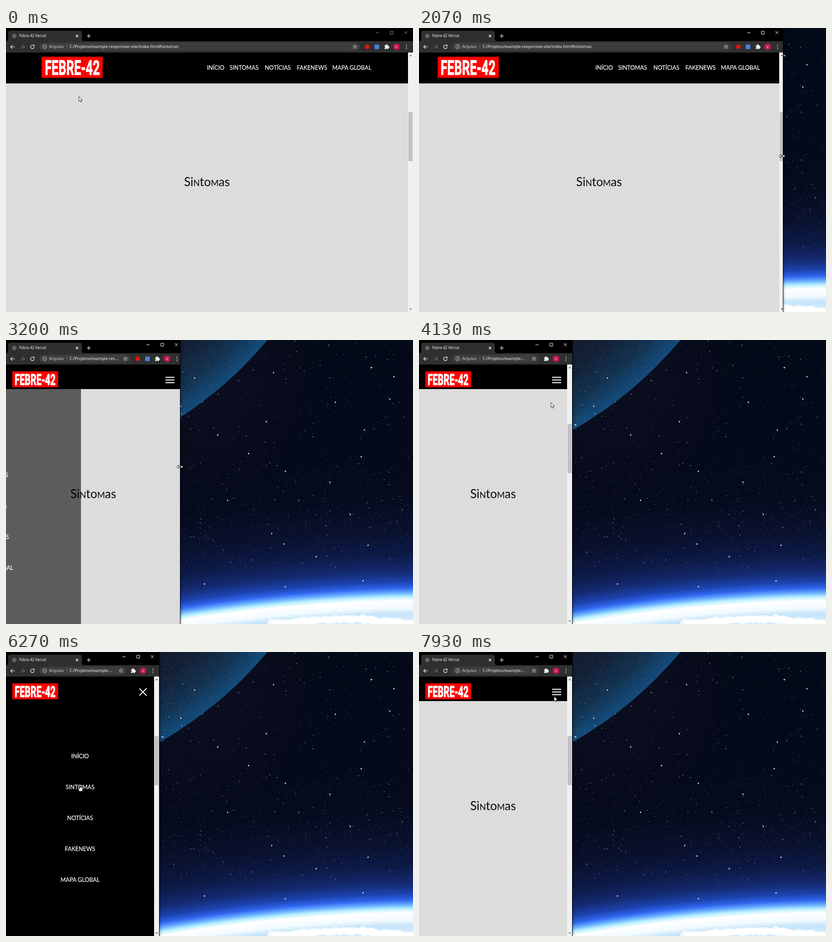
An HTML page with a canvas that plays this animation: 896x625 px, repeating every 8000 ms.

```html
<!DOCTYPE html>
<html lang="pt-BR">
<head>
<meta charset="utf-8">
<title>Febre-42 Vernal</title>
<style>
html, body { margin: 0; width: 896px; height: 625px; overflow: hidden; background: #04091a; }
body { position: relative; font-family: "Open Sans", "Noto Sans", sans-serif; color: #fff; }
body * { box-sizing: border-box; }
canvas, .win, .chrome, .page, .view, .header, .menu, .nav, .logo, .abs { position: absolute; }
svg { position: absolute; overflow: visible; fill: none; }
canvas { left: 0; top: 0; }

/* every animation shares the same 8 s clock */
.win, .chrome, .page, .pill, .extra, .controls, .thumb, .desk, .mob, .menu,
.burger i, .bubble, .bubble span, .cur, .cur svg {
  animation: 8s linear infinite;
}
.pill, .extra, .controls, .thumb, .desk, .mob, .bubble, .cur svg { animation-timing-function: step-end; }

.win { left: 0; top: 0; height: 625px; overflow: hidden; background: #000;
  box-shadow: 1px 0 #000, 2px 0 5px #0006; animation-name: win; }
.chrome { left: 0; top: 0; height: 54px; background: #000; animation-name: chrome; }
.page { left: 0; top: 54px; height: 571px; background: #f1f1f1; animation-name: page; }

.toolbar { left: 0; right: 0; top: 29px; height: 25px; background: #2f2f2f; }
.title { left: 29px; top: 11px; font: 8.1px/12px "Open Sans", sans-serif; white-space: nowrap; }
.pill { position: absolute; left: 73px; right: 117px; top: 32px; height: 18px; border-radius: 9px;
  background: #3d3d3d; font-size: 8.9px; line-height: 18px; animation-name: pill; }
.pill .kind { left: 22px; color: #ddd; }
.pill .url { left: 67px; right: 27px; overflow: hidden; white-space: nowrap; text-overflow: ellipsis; }
.pill .star { right: 6px; top: 4px; }
.extra { animation-name: extra; }
.controls { right: 0; top: 0; animation-name: controls; }

.view { left: 0; top: 0; bottom: 0; width: calc(100% - 11.5px); overflow: hidden; background: #dcdcdc; }
.scroll { right: 0; top: 0; width: 11.5px; height: 571px; }
.thumb { position: absolute; right: 1.5px; top: 131px; width: 9px; height: 108px; background: #c1c1c1; animation-name: thumb; }
h1 { position: absolute; left: 0; right: 0; top: 264px; margin: 0; text-align: center; color: #08080c;
  font: 400 26.4px/40px Lato, "Open Sans", sans-serif; white-space: nowrap; }
h1 small { font-size: .7em; text-transform: uppercase; }
.header { left: 0; width: 100%; background: #000; }
.desk { height: 68px; animation-name: desk; --pad: max(40.5px, calc((100% - 728px) / 2)); }
.mob { height: 54px; animation-name: mob; }
.logo { background: #f00; overflow: hidden; }
.logo b { position: absolute; left: 50%; top: 50%; white-space: nowrap; -webkit-text-stroke: 1.2px #fff;
  font: 700 45px/47px Roboto, "Liberation Sans", sans-serif; transform: translate(-50%, -50%) scaleX(.6); }
.desk .logo { left: var(--pad); top: 9px; width: 135px; height: 47px; border: 2px solid #d20000; }
.mob .logo { left: 13.5px; top: 15px; width: 101px; height: 35px; }
.mob .logo b { font-size: 33.5px; }
.nav { right: var(--pad); top: 25px; width: 364px; height: 18px; }
.nav span, .menu span { position: absolute; font: 400 12.5px/18px Lato, "Open Sans", sans-serif; white-space: nowrap; -webkit-text-stroke: .2px #fff; }
.nav span { left: var(--x); }
.menu { left: 0; top: 0; width: 100%; bottom: 0; background: #000; animation-name: menu; }
.menu span { left: 0; right: 0; text-align: center; top: calc(167px + 68px * var(--n)); }
.burger { right: 13.5px; top: 27px; width: 19.5px; height: 14px; }
.burger i { position: absolute; left: 0; width: 100%; height: 2px; background: #fff; }
.burger i:nth-child(1) { top: 0; animation-name: bar1; }
.burger i:nth-child(2) { top: 6px; animation-name: bar2; }
.burger i:nth-child(3) { top: 12px; animation-name: bar3; }
.bubble { position: absolute; left: 0; top: 611px; width: 111px; height: 14px; background: #000; animation-name: bubble; }
.bubble span { position: absolute; left: 3px; width: 92px; overflow: hidden; white-space: nowrap; text-overflow: ellipsis;
  color: #bbb; font-size: 7.8px; line-height: 13px; animation-name: bubbleText; }

.cur { position: absolute; left: 0; top: 0; animation-name: path; }
.cur .arrow { animation-name: arrow; }
.cur .resize { animation-name: resize; }
.cur .hand { animation-name: hand; }

@keyframes win {
  0%, 19.25% { width: 896px } 25.875% { width: 801.5px } 30% { width: 763px }
  34.125% { width: 631px } 40% { width: 383.5px } 41.5%, 100% { width: 337px }
}
@keyframes chrome {
  0%, 19.25% { width: 896px } 25.875% { width: 803.7px } 30% { width: 766px }
  34.125% { width: 636px } 40% { width: 391.7px } 41.75%, 100% { width: 337.7px }
}
@keyframes page {
  0%, 19.25% { width: 896px } 25.875% { width: 804.5px } 30% { width: 767px }
  34.125% { width: 636.5px } 40% { width: 396px } 41.75%, 100% { width: 337.5px }
}
@keyframes pill { 0% { right: 117px } 41%, 100% { right: 74px } }
@keyframes extra { 0% { opacity: 1 } 41%, 100% { opacity: 0 } }
@keyframes controls { 0% { stroke: #858585 } 19.5%, 100% { stroke: #fff } }
@keyframes thumb { 0% { background: #c1c1c1 } 11.2% { background: #a8a8a8 } 15.5%, 100% { background: #c1c1c1 } }
@keyframes desk { 0% { visibility: visible } 37.95%, 100% { visibility: hidden } }
@keyframes mob { 0% { visibility: hidden } 37.95%, 100% { visibility: visible } }
@keyframes menu {
  0% { visibility: hidden; transform: none; background: #000; animation-timing-function: step-end }
  37.95% { visibility: visible; transform: none; background: #000; animation-timing-function: ease }
  44.2%, 57.75% { visibility: visible; transform: translateX(-100%); background: #0004; animation-timing-function: ease }
  64%, 92.125% { visibility: visible; transform: none; background: #000; animation-timing-function: ease }
  98.375%, 100% { visibility: visible; transform: translateX(-100%); background: #0004 }
}
@keyframes bar1 {
  0%, 57.75%, 95.875%, 100% { transform: translate(0, 0) rotate(0) scaleX(1) }
  61.5%, 92.125% { transform: translate(-1.3px, 6px) rotate(-45deg) scaleX(1.14) }
}
@keyframes bar2 { 0%, 57.75%, 95.875%, 100% { opacity: 1 } 61.5%, 92.125% { opacity: 0 } }
@keyframes bar3 {
  0%, 57.75%, 95.875%, 100% { transform: translate(0, 0) rotate(0) scaleX(1) }
  61.5%, 92.125% { transform: translate(-1.3px, -6px) rotate(45deg) scaleX(1.14) }
}
@keyframes bubble { 0% { visibility: hidden } 79.5% { visibility: visible } 99%, 100% { visibility: hidden } }
@keyframes bubbleText { 0%, 80% { opacity: 0 } 82.5%, 100% { opacity: 1 } }
@keyframes path {
  0%, .875% { transform: translate(160px, 150px); animation-timing-function: ease-in-out }
  10.875% { transform: translate(873px, 276px) }
  11.6% { transform: translate(874px, 277px) }
  15.9%, 19.25% { transform: translate(889px, 283px) }
  25.875% { transform: translate(799px, 282px) }
  30% { transform: translate(760px, 282px) }
  34.125% { transform: translate(629px, 280.5px) }
  40% { transform: translate(383px, 279px) }
  41.5%, 42.5% { transform: translate(335px, 279px); animation-timing-function: ease-in-out }
  45.5% { transform: translate(500px, 235px); animation-timing-function: ease-in-out }
  51%, 52.5% { transform: translate(290px, 137px); animation-timing-function: ease-in-out }
  56.25%, 70.875% { transform: translate(302px, 90px); animation-timing-function: ease-in-out }
  78%, 88.375% { transform: translate(163px, 293px); animation-timing-function: ease-in-out }
  91.25%, 93.5% { transform: translate(302px, 90px); animation-timing-function: ease-in-out }
  98%, 100% { transform: translate(297px, 97px) }
}
@keyframes arrow {
  0% { visibility: visible } 14% { visibility: hidden } 42.8% { visibility: visible }
  55.5% { visibility: hidden } 71.6% { visibility: visible } 77.3% { visibility: hidden }
  88.8% { visibility: visible } 90.8% { visibility: hidden } 94.5%, 100% { visibility: visible }
}
@keyframes resize { 0% { visibility: hidden } 14% { visibility: visible } 42.8%, 100% { visibility: hidden } }
@keyframes hand {
  0% { visibility: hidden } 55.5% { visibility: visible } 71.6% { visibility: hidden }
  77.3% { visibility: visible } 88.8% { visibility: hidden }
  90.8% { visibility: visible } 94.5%, 100% { visibility: hidden }
}
</style>
</head>
<body>
<canvas id="sky" width="896" height="625"></canvas>

<div class="win">
  <div class="page">
    <div class="view">
      <h1>Si<small>n</small>to<small>m</small>as</h1>
      <div class="menu">
        <span style="--n:0">INÍCIO</span>
        <span style="--n:1">SINTOMAS</span>
        <span style="--n:2">NOTÍCIAS</span>
        <span style="--n:3">FAKENEWS</span>
        <span style="--n:4">MAPA GLOBAL</span>
      </div>
      <div class="header desk">
        <div class="logo"><b>FEBRE-42</b></div>
        <div class="nav">
          <span style="--x:0px">INÍCIO</span>
          <span style="--x:50px">SINTOMAS</span>
          <span style="--x:127.5px">NOTÍCIAS</span>
          <span style="--x:198px">FAKENEWS</span>
          <span style="--x:276px">MAPA GLOBAL</span>
        </div>
      </div>
      <div class="header mob">
        <div class="logo"><b>FEBRE-42</b></div>
        <div class="abs burger"><i></i><i></i><i></i></div>
      </div>
    </div>
    <div class="abs scroll">
      <svg width="11.5" height="571">
        <path d="M3.3 8L5.8 5 8.3 8Z M3.3 563.5L5.8 566.5 8.3 563.5Z" fill="#505050"/>
      </svg>
      <div class="thumb"></div>
    </div>
  </div>

  <div class="chrome">
    <div class="abs toolbar"></div>
    <svg width="200" height="54" stroke="#fff" stroke-width="1.2">
      <path d="M0 29Q5 29 5 24V11Q5 6 10 6H162Q167 6 167 11V24Q167 29 172 29Z" fill="#2f2f2f" stroke="none"/>
      <circle cx="18.5" cy="17.5" r="4.7" fill="#777" stroke="none"/>
      <path d="M15 16Q18 14 18 18L20 21M20 13.5L20.5 16.5 23 17" stroke="#3a3a3a"/>
      <path d="M153.8 14.8L159 20M159 14.8L153.8 20M178 17.5H186.5M182.2 13.2V21.8"/>
      <path d="M19.5 41.5H10.5M14.5 37.3L10.3 41.5 14.5 45.7"/>
      <path d="M31.8 41.5H40.8M36.8 37.3L41 41.5 36.8 45.7" stroke="#777"/>
      <path d="M61.2 38.7A4 4 0 1 0 62 42.3M62.2 36.8V40H59"/>
    </svg>
    <div class="abs title">Febre-42 Vernal</div>
    <div class="pill">
      <svg width="70" height="18" stroke="#ddd">
        <circle cx="12" cy="9" r="4.2"/><path d="M12 8.4V11.4M12 6.4V7.5"/>
        <path d="M61 4.5V13.5" stroke="#777"/>
      </svg>
      <span class="abs kind">Arquivo</span>
      <span class="abs url">C:/Projetos/example-responsive-site/index.html#sintomas</span>
      <svg class="star" width="10" height="10" stroke="#ddd" stroke-width=".9">
        <path d="M5 .8L6.2 3.7 9.3 3.9 6.9 5.9 7.7 9 5 7.3 2.3 9 3.1 5.9 .7 3.9 3.8 3.7Z"/>
      </svg>
    </div>
    <svg width="120" height="25" style="right:0;top:29px">
      <g class="extra">
        <circle cx="19" cy="12.3" r="5" fill="#e8110f"/>
        <rect x="35.5" y="7.5" width="10" height="10" fill="#4a82dc"/>
      </g>
      <path d="M57.5 9H60.3A1.6 1.6 0 1 1 63.3 9H66V11.7A1.6 1.6 0 1 1 66 14.7V17.3H63.2A1.5 1.5 0 0 0 60.3 17.3H57.5V14.7A1.6 1.6 0 0 0 57.5 11.6Z" fill="#eee"/>
      <circle cx="83.5" cy="12.3" r="7.3" fill="#c2185b"/>
      <text x="83.5" y="15.2" font-size="8" text-anchor="middle" fill="#fff">V</text>
      <path d="M105.5 7.6V9.2M105.5 11.6V13.2M105.5 15.6V17.2" stroke="#fff" stroke-width="1.7"/>
    </svg>
    <svg class="controls" width="94" height="20">
      <path d="M12.5 10.5H19.5M43.8 7.2H50.2V13.5H43.8ZM74.8 7L81.2 13.4M81.2 7L74.8 13.4"/>
    </svg>
  </div>
  <div class="bubble"><span>C:/Projetos/example-responsive-site/index.html</span></div>
</div>

<div class="cur">
  <svg class="arrow" width="9" height="14"><path d="M.5 .5V11.5L3 9.2 4.7 13 6.4 12.2 4.8 8.5H8Z" fill="#fff" stroke="#000" stroke-width=".8"/></svg>
  <svg class="resize" width="1" height="1"><path d="M-7 0L-3 -4V-1H3V-4L7 0 3 4V1H-3V4Z" fill="#fff" stroke="#000" stroke-width=".9"/></svg>
  <svg class="hand" width="1" height="1"><path d="M-1 1Q0 -.5 1 1V5L5 6Q6.3 6.3 6 8L5 13.5H-1.5L-4 9Q-4.5 7.3 -3 7.5L-1 9Z" fill="#fff" stroke="#000" stroke-width=".8"/></svg>
</div>

<script>
const ctx = document.getElementById('sky').getContext('2d');
let seed = 42;
const rand = () => (seed = (seed * 16807) % 2147483647) / 2147483647;

function radial(x, y, r0, r1, stops) {
  const g = ctx.createRadialGradient(x, y, r0, x, y, r1);
  for (const [r, color] of stops) g.addColorStop((r - r0) / (r1 - r0), color);
  return g;
}
function dot(x, y, r, color) {
  ctx.fillStyle = color;
  ctx.beginPath();
  ctx.arc(x, y, r, 0, 7);
  ctx.fill();
}

// horizon glow around a very large circle
const R = 3650;
const glow = [[-70, '#e6f4ff'], [-28, '#c6e4fa'], [-16, '#f2fbff'], [0, '#fff'], [9, '#b8f0ff'], [18, '#64aaff'],
  [28, '#2f64ee'], [42, '#1c42ac'], [65, '#142a70'], [100, '#0d1a48'], [150, '#09112e'], [230, '#050a1c'], [600, '#040918']];
ctx.fillStyle = radial(950, 573 + R, R - 70, R + 600, glow.map(([d, c]) => [R + d, c]));
ctx.fillRect(0, 0, 896, 625);

ctx.fillStyle = radial(400, 60, 0, 300, [[0, 'rgba(32,28,48,.3)'], [300, 'rgba(32,28,48,0)']]);
ctx.fillRect(0, 0, 896, 400);

dot(-100, -567, 882, radial(-100, -567, 680, 882,
  [[680, '#141828'], [770, '#132036'], [830, '#123250'], [882, '#144c7c']]));

for (let i = 0; i < 2200; i++) {
  const x = 338 + rand() * 558;
  const y = i < 1000 ? 380 + (rand() + rand() - 1) * 130 : rand() * 520;
  dot(x, y, .3 + rand() * .4, `rgba(205,218,245,${.15 + rand() * .45})`);
}
for (let i = 0; i < 600; i++) {
  const x = 338 + rand() * 230, y = rand() * 195;
  if (Math.hypot(x + 100, y + 567) < 870) dot(x, y, .3 + rand() * .4, `rgba(190,210,235,${.2 + rand() * .4})`);
}
for (let i = 0; i < 150; i++) dot(338 + rand() * 558, rand() * 500, .6 + rand() * .35, 'rgba(235,240,255,.75)');

const bright = [589,72, 725,137, 789,198, 713,313, 615,289, 758,384, 683,477, 534,250, 573,180, 804,61, 854,81,
  466,209, 488,353, 585,426, 612,449, 797,452, 415,84, 385,146, 344,187, 437,537, 615,543, 782,257, 845,130, 786,530];
for (let i = 0; i < bright.length; i += 2) dot(bright[i], bright[i + 1], 1.4, '#f4f7ff');

// cloud tops
for (let x = 585; x < 910; x += 5) {
  const top = 616 - 10 * Math.sin((x - 585) / 105) ** 2;
  dot(x, top + 6 + rand() * 4, 6 + rand() * 4, 'rgba(255,255,255,.8)');
}
</script>
</body>
</html>
```
